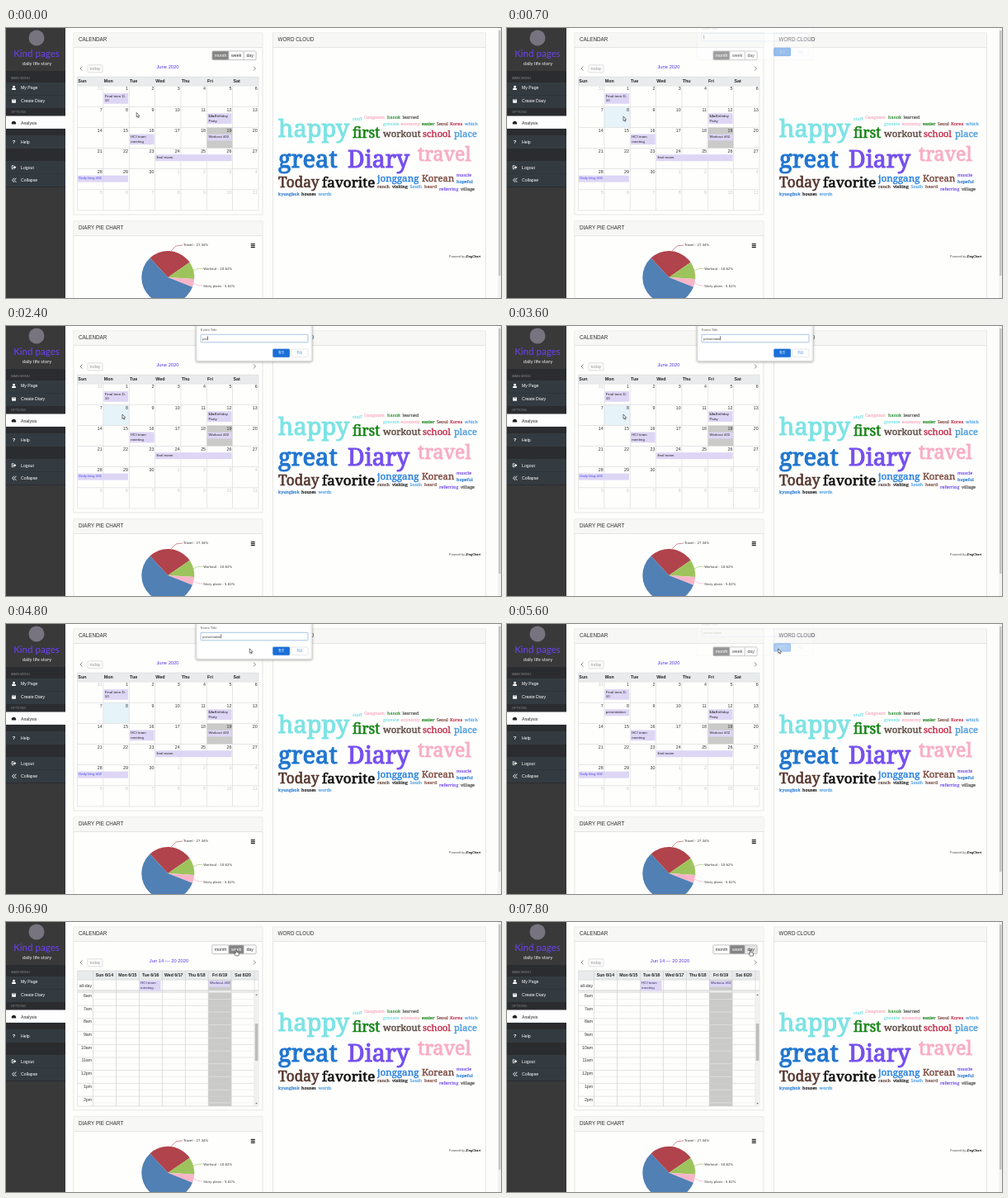
Animation of 600 by 327 pixels, one loop 8 s. Source, as an HTML page with a canvas:

```html
<!DOCTYPE html>
<html lang="en">
<head>
<meta charset="utf-8">
<title>Diary dashboard</title>
<style>
html, body { margin: 0; width: 100%; height: 100%; overflow: hidden; background: #fdfdfb; }
canvas { display: block; width: 600px; height: 327px; }
</style>
</head>
<body>
<canvas id="stage"></canvas>
<script>
const W = 600, H = 327, LOOP = 8000, STEP = 100;
const SANS = '"Liberation Sans", Arial, sans-serif';
const SERIF = '"Noto Serif", serif';
const LATO = 'Lato, sans-serif';
const WIDE = '"DejaVu Sans", sans-serif';
const CJK = '"Noto Sans CJK KR", "Noto Sans CJK", sans-serif';
const INK = '#333', LINE = '#dcdcdc', PURPLE = '#5a35e6', LILAC = '#ded6f5', TODAY = '#cacac8';

const canvas = document.getElementById('stage');
const ratio = window.devicePixelRatio || 1;
canvas.width = W * ratio;
canvas.height = H * ratio;
const ctx = canvas.getContext('2d');

function rect(x, y, w, h, color) {
  ctx.fillStyle = color;
  ctx.fillRect(x, y, w, h);
}

function frame(x, y, w, h, color, fill, radius = 0) {
  ctx.beginPath();
  ctx.roundRect(x, y, w, h, radius);
  if (fill) { ctx.fillStyle = fill; ctx.fill(); }
  ctx.strokeStyle = color;
  ctx.lineWidth = 0.7;
  ctx.stroke();
}

function path(points, color, width = 0.6) {
  ctx.beginPath();
  points.forEach(([x, y]) => ctx.lineTo(x, y));
  ctx.strokeStyle = color;
  ctx.lineWidth = width;
  ctx.stroke();
}

function shape(points, fill, outline) {
  ctx.beginPath();
  points.forEach(([x, y]) => ctx.lineTo(x, y));
  ctx.closePath();
  ctx.fillStyle = fill;
  ctx.fill();
  if (outline) {
    ctx.strokeStyle = outline;
    ctx.lineWidth = 0.6;
    ctx.stroke();
  }
}

function dot(x, y, r, color) {
  ctx.beginPath();
  ctx.arc(x, y, r, 0, 7);
  ctx.fillStyle = color;
  ctx.fill();
}

function text(str, x, y, size, color = INK, { align = 'left', style = '', font = SANS } = {}) {
  ctx.font = `${style} ${size}px ${font}`;
  ctx.textAlign = align;
  ctx.fillStyle = color;
  ctx.fillText(str, x, y);
}

function panel(x, y, w, h, title) {
  frame(x, y, w, h, LINE, '#fefefd');
  rect(x + 0.4, y + 0.4, w - 0.8, 17.2, '#f7f7f6');
  rect(x, y + 17.3, w, 0.7, LINE);
  text(title, x + 6, y + 10.2, 6.3);
}

/* Sidebar */

const icons = {
  user(x, y) { dot(x, y - 1.3, 1.5, '#fff'); rect(x - 2.3, y + 0.5, 4.6, 2, '#fff'); },
  book(x, y) { rect(x - 2.4, y - 2, 4.8, 4.2, '#fff'); rect(x - 1.4, y - 1, 2.8, 0.6, '#555'); },
  gauge(x, y) { ctx.beginPath(); ctx.arc(x, y + 1, 2.7, 2.8, 6.6); ctx.fillStyle = '#222'; ctx.fill(); },
  help(x, y) { text('?', x, y + 2.1, 6, '#fff', { align: 'center', style: 'bold' }); },
  exit(x, y) {
    path([[x, y - 2], [x - 2.3, y - 2], [x - 2.3, y + 2], [x, y + 2]], '#fff', 0.8);
    shape([[x - 1, y - 0.7], [x + 0.7, y - 0.7], [x + 0.7, y - 2], [x + 2.8, y], [x + 0.7, y + 2], [x + 0.7, y + 0.7], [x - 1, y + 0.7]], '#fff');
  },
  collapse(x, y) {
    for (const dx of [0, 2.5]) path([[x + dx + 0.4, y - 2.6], [x + dx - 2, y], [x + dx + 0.4, y + 2.6]], '#fff', 0.9);
  }
};

function sidebar() {
  rect(0, 0, 72, H, '#39393a');
  rect(0, 52, 72, 141, '#2a2c2f');
  for (const [y, h] of [[66, 31], [130, 16], [161, 31]]) rect(0, y, 72, h, '#343b40');
  for (const y of [81, 176]) rect(0, y, 72, 0.6, '#2b3034');
  rect(0, 106.5, 72, 15.4, '#fefefe');

  dot(37, 12, 9.5, '#77737f');
  text('Kind pages', 37, 34.5, 11.6, '#6c42f0', { align: 'center', font: LATO });
  text('daily life story', 37.5, 45, 5.8, '#f2f2f2', { align: 'center', font: LATO });
  text('MAIN MENU', 6, 61.5, 4, '#85898d');
  text('OPTIONS', 6, 102.7, 4, '#85898d');

  const items = [['user', 'My Page', 72.5], ['book', 'Create Diary', 88.5], ['gauge', 'Analysis', 114.6],
    ['help', 'Help', 138], ['exit', 'Logout', 168.7], ['collapse', 'Collapse', 184.3]];
  for (const [icon, label, y] of items) {
    icons[icon](9.5, y);
    text(label, 18, y + 1.9, 5.2, icon === 'gauge' ? '#222' : '#fff');
  }
}

/* Calendar */

function event(x, y, w, lines, color = '#222') {
  rect(x, y, w, lines.length > 1 ? 12.7 : 8, LILAC);
  lines.forEach((line, i) => text(line, x + 1.2, y + 4.6 + i * 5.8, 4.4, color));
}

function calendarTop(title, week, t) {
  const hover = t >= 6600 && !week;
  const pressed = t >= 6800 && !week;
  const buttons = [['month', 250, 20, !week], ['week', 270, 18.3, week], ['day', 288.3, 14.7, false]];
  frame(250, 28, 53, 10.6, '#c4c4c4', '#fff', 1);
  for (const [label, x, w, active] of buttons) {
    let fill = active ? '#858585' : '#fdfdfd', ink = active ? '#fff' : INK;
    if (label === 'week' && hover) fill = pressed ? '#777' : '#e2e2e2';
    if (label === 'day' && t >= 7200) fill = '#e6e6e6';
    frame(x, 28, w, 10.6, '#bbb', fill, 1);
    text(label, x + w / 2, 35.1, 5.3, ink, { align: 'center' });
  }
  path([[92.5, 46.5], [90, 49], [92.5, 51.5]], '#555', 0.7);
  path([[300, 46.5], [302.5, 49], [300, 51.5]], '#555', 0.7);
  frame(99, 44.8, 18, 9, '#d2d2d2', '#fdfdfd', 1);
  text('today', 108, 51.1, 5.3, '#999', { align: 'center' });
  text(title, week ? 197.5 : 196, 49.4, 5.8, PURPLE, { align: 'center' });
}

function monthView(t) {
  const left = 86.5, top = 70, cw = 31.35, rh = 25.15;
  const days = ['Sun', 'Mon', 'Tue', 'Wed', 'Thu', 'Fri', 'Sat'];
  calendarTop('June 2020', false, t);
  rect(left, 59, cw * 7, 11, '#e9ebec');
  days.forEach((d, i) => text(d, left + i * cw + 0.8, 66.3, 5.4, '#222', { style: 'bold' }));

  if (t >= 600 && t < 5600) rect(left + cw, top + rh, cw, rh, '#e6f3f8');
  rect(left + 5 * cw, top + 2 * rh, cw, rh, TODAY);
  for (let i = 0; i <= 7; i++) rect(left + i * cw - 0.3, i % 7 ? 70 : 59, 0.7, i % 7 ? rh * 6 : rh * 6 + 11, LINE);
  for (let i = 0; i <= 6; i++) rect(left, top + i * rh - 0.3, cw * 7, 0.7, LINE);
  rect(left, 58.7, cw * 7, 0.7, LINE);
  for (let i = 0; i < 42; i++) {
    const inside = i >= 1 && i <= 30;
    const n = i === 0 ? 31 : inside ? i : i - 30;
    text(n, left + (i % 7 + 1) * cw - 1.2, top + Math.floor(i / 7) * rh + 5.4, 5.3, inside ? INK : '#c8c8c8', { align: 'right' });
  }

  event(118.5, 79, 29.6, ['Final term D-', '10']);
  event(244.2, 103.3, 29.4, ['', 'Party']);
  text('12a', 245, 107.9, 4.4, '#222', { style: 'bold' });
  text('Birthday', 252.8, 107.9, 4.4, '#222');
  event(150, 128.5, 29.6, ['HCI team', 'meeting']);
  event(244.2, 128.5, 29.4, ['Workout #02']);
  event(181.2, 153.2, 92.4, ['final exam']);
  event(87, 178.6, 61, ['Daily blog #02'], '#4a4af0');
  if (t >= 5600) event(118.5, 103.3, 29.6, ['presentation']);
}

function weekView(t) {
  const left = 105.4, cw = 27.95, top = 85.5, hour = 15.7;
  const days = ['Sun', 'Mon', 'Tue', 'Wed', 'Thu', 'Fri', 'Sat'];
  calendarTop('Jun 14 — 20 2020', true, t);
  rect(86.5, 59, 219.5, 11, '#e9ebec');
  rect(left + 5 * cw, 70, cw, 153, TODAY);
  for (let i = 0; i <= 18; i++) {
    const y = top + i * hour / 2;
    if (y < 223) rect(i % 2 ? left : 86.5, y - 0.3, i % 2 ? cw * 7 : 214.5, 0.6, i % 2 ? '#e9e9e9' : '#d2d2d2');
  }
  rect(86.5, 82.8, 219.5, 2.6, '#ececec');
  for (let i = 0; i <= 7; i++) rect(left + i * cw - 0.3, 59, 0.7, 164, '#d2d2d2');
  for (const y of [59, 70, 82.8, 223]) rect(86.5, y - 0.3, 219.5, 0.7, '#d2d2d2');
  for (const x of [86.5, 306]) rect(x - 0.3, 59, 0.7, 164, LINE);
  days.forEach((d, i) => text(`${d} 6/${14 + i}`, left + (i + 0.5) * cw, 66.4, 5.2, '#222', { align: 'center', style: 'bold' }));

  text('all-day', 104, 78.5, 5.2, INK, { align: 'right' });
  for (let h = 6; h <= 14; h++) {
    const label = (h > 12 ? h - 12 : h) + (h < 12 ? 'am' : 'pm');
    text(label, 104, top + (h - 6) * hour + 5.4, 5.2, INK, { align: 'right' });
  }
  event(left + 2 * cw + 0.6, 70.8, 25.6, ['HCI team', 'meeting'], '#332f66');
  event(left + 5 * cw + 0.6, 70.8, 25.6, ['Workout #02'], '#332f66');

  rect(301.4, 85.5, 4.4, 137.3, '#f1f1f1');
  rect(301.8, 123, 3.7, 45, '#bdbdbd');
  shape([[302.3, 89], [303.6, 87.2], [304.9, 89]], '#777');
  shape([[302.3, 219], [303.6, 220.8], [304.9, 219]], '#777');
}

/* Charts */

function pieChart() {
  const cx = 196.3, cy = 302, r = 32;
  panel(82, 234, 229, 110, 'DIARY PIE CHART');
  for (const y of [261, 263, 265]) rect(296.8, y, 5, 1.2, '#222');
  let angle = 227 * Math.PI / 180;
  for (const [share, color] of [[27.34, '#b0434b'], [10.62, '#9dc45c'], [5.02, '#f8b4c8'], [57.02, '#5080b4']]) {
    const end = angle + share / 50 * Math.PI;
    ctx.beginPath();
    ctx.moveTo(cx, cy);
    ctx.arc(cx, cy, r, angle, end);
    ctx.closePath();
    ctx.fillStyle = color;
    ctx.fill();
    angle = end;
  }
  path([[200, 270], [206, 264], [214, 263]], '#b0434b');
  path([[227, 294], [232, 291.6], [238.5, 291.3]], '#9dc45c');
  path([[228, 309], [232, 311.4], [238.5, 312.2]], '#f0a8bd');
  text('Travel - 27.34%', 215, 264.4, 3.9, INK, { font: WIDE });
  text('Workout - 10.62%', 239.3, 292.7, 3.9, INK, { font: WIDE });
  text('Story plans - 5.02%', 239.3, 313.8, 3.9, INK, { font: WIDE });
}

const bigWords = [
  ['happy', 330, 132, 29, '#7de3e4'], ['great', 330, 169, 29.2, '#2176cf'], ['Diary', 414, 169, 28.4, '#7650ee'],
  ['travel', 499, 160.5, 23.2, '#f9adc3'], ['first', 420, 133.3, 17.2, '#148414'], ['Today', 330, 193, 17.3, '#57382f'],
  ['favorite', 383, 193, 17.1, '#111'], ['workout', 457, 132.3, 11.3, '#5d4b42'], ['school', 505, 132.3, 11.2, '#c23350'],
  ['place', 543, 132.3, 11.1, '#4f9fe0'], ['jonggang', 450, 186, 11.6, '#2b82de'], ['Korean', 504, 186, 11.3, '#7b4b42']
];
const smallWords = [
  ['stuff', 420, 112.4, '#7de3e4'], ['Gangnam', 434, 109.6, '#f9adc3'], ['hanok', 462, 109.6, '#3a9440'], ['learned', 480.5, 109.6, '#555'],
  ['gravate', 457, 118, '#7de3e4'], ['economy', 478.5, 118, '#f9adc3'], ['easier', 504, 118, '#148414'], ['Seoul', 522, 118, '#7b4b42'],
  ['Korea', 538, 118, '#c23350'], ['which', 556, 118, '#4f9fe0'], ['muscle', 546, 180, '#7650ee'], ['hopeful', 546, 188.4, '#2176cf'],
  ['ranch', 450, 194, '#57382f'], ['visiting', 468, 194, '#111'], ['South', 489.5, 194, '#4f9fe0'], ['heard', 507, 194, '#7b4b42'],
  ['referring', 525, 197.2, '#7650ee'], ['village', 551, 197.2, '#444'], ['kyungbok', 330, 202.8, '#2176cf'],
  ['houses', 358, 202.8, '#111'], ['words', 378.5, 202.8, '#4f9fe0']
];

// A thin outline gives the slab-like medium weight.
function cloudWord(word, x, y, size, color) {
  text(word, x, y, size, color, { font: SERIF });
  ctx.strokeStyle = color;
  ctx.lineWidth = size * 0.038;
  ctx.lineJoin = 'round';
  ctx.strokeText(word, x, y);
}

function wordCloud() {
  panel(323.5, 6, 258, 340, 'WORD CLOUD');
  for (const word of bigWords) cloudWord(...word);
  for (const [word, x, y, color] of smallWords) cloudWord(word, x, y, 5.4, color);
  text('Powered by', 537, 277.6, 3.6, '#444', { font: SANS });
  text('ZingChart', 557.3, 277.6, 3.8, '#111', { font: SANS, style: 'italic bold' });
}

/* Prompt */

const typing = [[2100, 1], [2200, 2], [2400, 3], [2700, 4], [2900, 5], [3000, 6], [3100, 7], [3300, 8], [3400, 9], [3600, 11], [3700, 12]];

function promptAlpha(t) {
  if (t < 700) return 0;
  if (t < 800) return 0.45;
  if (t < 5500) return 1;
  return [0.8, 0.38, 0.1][(t - 5500) / STEP] || 0;
}

function caretOn(t) {
  return t < 1300 || (t >= 1800 && t < 4300) || (t >= 4800 && t < 5300);
}

function promptBox(t) {
  const alpha = promptAlpha(t);
  if (!alpha) return;
  ctx.save();
  ctx.translate(0, (alpha - 1) * 7);
  ctx.globalAlpha = alpha * alpha;
  if (alpha === 1) {
    ctx.shadowColor = 'rgba(0,0,0,.3)';
    ctx.shadowBlur = 3 * ratio;
    ctx.shadowOffsetY = 0.6 * ratio;
  }
  frame(230.5, -4, 140.5, 46.8, '#d4d4d4', '#fff', 1.5);
  ctx.shadowColor = 'transparent';
  text('Event Title', 236, 6, 4.2, '#555');
  frame(236, 10.3, 130, 9.5, '#83abd9', '#fff', 1);

  ctx.globalAlpha = alpha;
  const count = typing.reduce((n, [at, len]) => t >= at ? len : n, 0);
  const typed = 'presentation'.slice(0, count);
  text(typed, 238.3, 16.5, 4, alpha < 1 ? '#888' : '#333');
  if (caretOn(t)) rect(238.5 + ctx.measureText(typed).width, 12.3, 0.6, 5, '#222');

  frame(323.7, 28, 20, 9.6, '#1a6fd8', t >= 5200 ? '#2f7fde' : '#1a6fd8', 1);
  text('확인', 333.7, 34.4, 4, '#fff', { align: 'center', font: CJK });
  ctx.globalAlpha = alpha * alpha;
  frame(346, 28, 20, 9.6, '#dedede', '#fff', 1);
  text('취소', 356, 34.4, 4, '#3d7fd0', { align: 'center', font: CJK });
  ctx.restore();
}

/* Pointer: [start, end, x, y] of each move */

const moves = [[0, 400, 141, 107], [4500, 4800, 295.3, 29.8], [4800, 5300, 328.8, 30], [6300, 6600, 279, 34], [6900, 7200, 295, 34], [7700, 7800, 295.3, 34.3]];

function pointerAt(t) {
  let x = 158.2, y = 102.5;
  for (const [from, to, tx, ty] of moves) {
    const p = Math.min(1, Math.max(0, (t - from) / (to - from)));
    const k = p * (2 - p);
    x += (tx - x) * k;
    y += (ty - y) * k;
  }
  return [x, y];
}

function pointer(t) {
  const [x, y] = pointerAt(t);
  ctx.save();
  ctx.translate(x, y);
  if (t >= 6600) {
    shape([[-0.8, 0], [0.5, 0], [0.7, 2.5], [3, 3.1], [3.4, 4], [3, 6.8], [-0.8, 6.8], [-2.6, 4], [-2, 3.4], [-0.8, 4.2]], '#fff', '#222');
  } else {
    shape([[0, 0], [0, 5.4], [1.2, 4.3], [2.1, 6.2], [3, 5.8], [2.1, 4], [3.7, 3.9]], '#fff', '#222');
  }
  ctx.restore();
}

function draw(t) {
  const week = t >= 6900;
  const shift = week ? 1.8 : 0;
  ctx.setTransform(ratio, 0, 0, ratio, 0, 0);
  rect(0, 0, W, H, '#fdfdfb');
  panel(82, 6, 229, 220 + shift, 'CALENDAR');
  if (week) weekView(t);
  else monthView(t);
  ctx.save();
  ctx.translate(0, shift);
  pieChart();
  ctx.restore();
  wordCloud();
  rect(596.3, 0, 3.7, H, '#f1f1f1');
  rect(597, 3, 2.6, 297, '#c6c6c6');
  sidebar();
  promptBox(t);
  pointer(t);
}

function tick() {
  const t = performance.now() % LOOP;
  draw(Math.floor(t / STEP) * STEP);
  requestAnimationFrame(tick);
}
tick();
</script>
</body>
</html>
```
